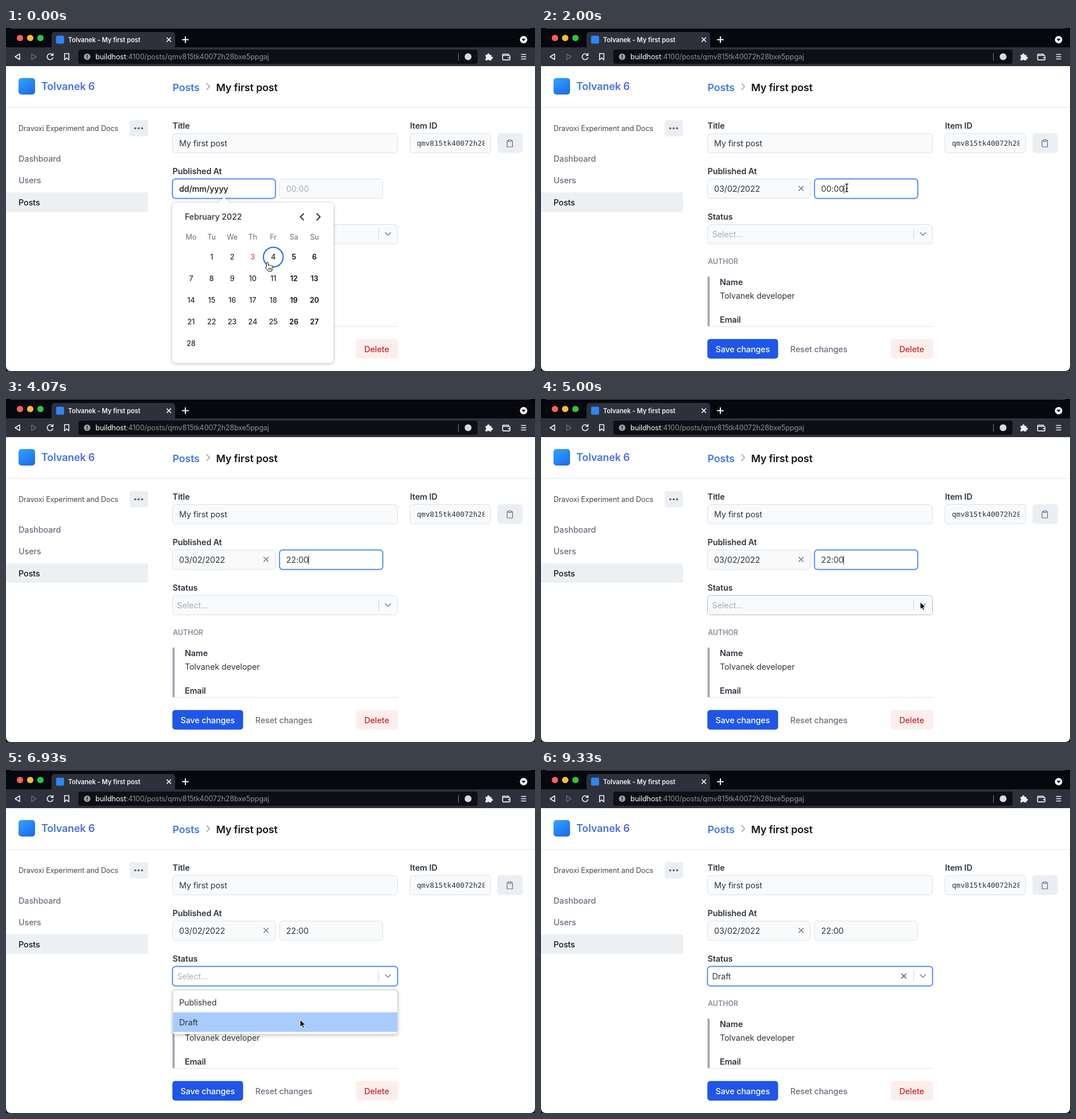
An HTML page for the animation above (9390 ms loop, 929 by 603 pixels).

```html
<!DOCTYPE html>
<html lang="en">
<head>
<meta charset="utf-8">
<title>Post editor</title>
<style>
  html, body { margin: 0; width: 100%; height: 100%; overflow: hidden; background: #000; }
  svg { display: block; font-family: Inter, sans-serif; letter-spacing: -.007em; }
  .mono { font-family: "DejaVu Sans Mono", monospace; letter-spacing: 0; }
  .field { fill: #f8fafb; stroke: #dce1e6; }
  .field.hover { stroke: #b4bcc6; }
  .field.focus { fill: #fff; stroke: #3b80ee; stroke-width: 1.5; filter: drop-shadow(0 0 1px #7fb2f8); }
  .popup { fill: #fff; filter: drop-shadow(0 1px 3px #0004); }
  .line { fill: none; stroke-width: 1.6; stroke-linecap: round; stroke-linejoin: round; }
  .cursor { stroke-linejoin: round; }
</style>
</head>
<body>
<svg id="stage" width="929" height="603" viewBox="0 0 929 603"></svg>
<script>
const LOOP = 9390;
const INK = '#30363f', MUTED = '#68707c', FAINT = '#a9aeb5';
const stage = document.getElementById('stage');

// y is the middle of the capital letters
const text = (x, y, str, { size = 14.45, weight = 400, fill = INK, anchor = 'start', extra = '' } = {}) =>
  `<text x="${x}" y="${y + size * 0.364}" font-size="${size}" font-weight="${weight}" fill="${fill}" text-anchor="${anchor}" ${extra}>${str}</text>`;
const rect = (x, y, w, h, fill, r = 0, extra = '') =>
  `<rect x="${x}" y="${y}" width="${w}" height="${h}" rx="${r}" fill="${fill}" ${extra}/>`;
const field = (x, y, w, id = '') =>
  `<rect id="${id}" class="field" x="${x}" y="${y}" width="${w}" height="34" rx="5"/>`;
const circle = (x, y, r, fill, extra = '') => `<circle cx="${x}" cy="${y}" r="${r}" fill="${fill}" ${extra}/>`;
const line = (d, stroke, width = 1.6) => `<path class="line" d="${d}" stroke="${stroke}" style="stroke-width:${width}"/>`;
const cross = (x, y, r, stroke, width) =>
  line(`M${x - r} ${y - r}l${2 * r} ${2 * r}m0 ${-2 * r}l${-2 * r} ${2 * r}`, stroke, width);
const label = (x, y, str) => text(x, y, str, { weight: 600 });
const group = (id, ...parts) => `<g id="${id}">${parts.join('')}</g>`;

const browser = () => [
  rect(0, 0, 929, 603, '#07080e', 9),
  line('M9 .5H920', '#4b4d55', 1),
  ...['#ff5f57', '#febc2e', '#28c840'].map((c, i) => circle(24.5 + 18 * i, 17.5, 5.6, c)),
  `<path d="M80 35V13q0-6 6-6H291q6 0 6 6V35z" fill="#2e313c"/>`,
  rect(88, 13.5, 14, 14, '#2b87f5', 2),
  text(109, 20.5, 'Tolvanek - My first post', { size: 11.3, weight: 600, fill: '#f0f1f4' }),
  cross(286, 20.5, 3.4, '#f0f1f4'),
  line('M310 20.5H320M315 15.5V25.5', '#fff', 2),
  circle(909, 20.5, 6.5, '#fff'),
  `<path d="M905.3 18.7h7.4l-3.7 4.6z" fill="#15161c"/>`,
  rect(0, 34, 929, 34, '#2e313c'),
  rect(127, 38, 701, 25, '#0e0f14', 4),
  line('M24 45.5V55.5L16 50.5z', '#f0f1f4'),
  line('M45 45.5V55.5L53 50.5z', '#62656f'),
  line('M81.8 47.5A5.2 5.2 0 1 0 82.5 52M82.6 44.8V48.3H79', '#f0f1f4'),
  line('M102.8 45h7.6v11l-3.8-3.3-3.8 3.3z', '#f0f1f4'),
  circle(142.5, 50.5, 5.7, '#9c9ea6'),
  line('M142.5 47.7v3.4m0 2.3v.1', '#0e0f14'),
  text(157, 50.5, 'buildhost<tspan fill="#8f9199">:4100/posts/qmv815tk40072h28bxe5ppgaj</tspan>', { size: 12.65, fill: '#fff' }),
  line('M794.5 44.5V57', '#777a84', 1),
  circle(811.5, 50.5, 6, '#d9dae0'),
  `<path d="M842 47.2h3.2a2 2 0 1 1 3.8 0h3.4v3.3a2 2 0 1 1 0 3.8v2.8h-3.6a1.9 1.9 0 0 0-3.6 0H842v-3.5a1.9 1.9 0 0 0 0-3.6z" fill="#eceef2"/>`,
  line('M873 46h9.5v2.2M872.2 46.5v8.4q0 1.2 1.2 1.2h10.4q1.2 0 1.2-1.2v-5.5q0-1.2-1.2-1.2h-10.4M882 52.2h3', '#f0f1f4'),
  line('M905 46.5h8m-8 4h8m-8 4h8', '#f0f1f4', 1.4),
  `<path d="M0 67H929V594q0 9-9 9H9q-9 0-9-9z" fill="#fff"/>`,
];

const sidebar = () => [
  rect(22, 88, 29, 29, 'url(#brand)', 5),
  text(62, 102.5, 'Tolvanek 6', { size: 18, weight: 600, fill: 'url(#title)' }),
  line('M0 139.5H929', '#e1e5e9', 1),
  text(22, 176.5, 'Dravoxi Experiment and Docs', { size: 12.8, fill: '#424954' }),
  rect(217, 162, 32.5, 28.5, '#ebeff3', 4),
  ...[0, 1, 2].map(i => circle(227 + 6 * i, 176.3, 1.9, '#626974')),
  text(22, 230, 'Dashboard', { weight: 500, fill: MUTED }),
  text(22, 268, 'Users', { weight: 500, fill: MUTED }),
  `<path d="M0 289H246q3.5 0 3.5 3.5V319.5q0 3.5-3.5 3.5H0z" fill="#ecf0f3"/>`,
  text(22, 306.5, 'Posts', { weight: 500, fill: '#121820' }),
];

const form = () => [
  text(292.5, 104, 'Posts', { size: 17.9, weight: 600, fill: '#4179e6' }),
  line('M352.5 97.5L357.5 103L352.5 108.5', '#9aa1ab'),
  text(369, 104, 'My first post', { size: 17.9, weight: 600, fill: '#10151c' }),
  label(292.5, 172, 'Title'),
  field(292.5, 185.5, 395),
  text(304, 202.5, 'My first post'),
  label(709.5, 172, 'Item ID'),
  field(709.5, 185.5, 141.5),
  text(721.5, 202, 'qmv815tk40072h28', { size: 12.65, extra: 'class="mono" clip-path="url(#idClip)"' }),
  rect(863, 185, 44.5, 34.5, '#ebeff3', 5),
  line('M882.5 198h-2.5v11h9.5v-11h-2.5m-4.5-1.5h4.5v3h-4.5z', '#626a75', 1.2),
  label(292.5, 251.5, 'Published At'),
  field(292.5, 265.5, 180.5, 'dateField'),
  text(304, 283, '', { extra: 'id="dateText"' }),
  group('dateClear', cross(456.7, 282, 3.9, '#555c66', 1.3)),
  field(480.5, 265.5, 181, 'timeField'),
  rect(492, 266.5, 40, 32, '#a8cdf8', 0, 'id="selection"'),
  text(492, 283, '', { extra: 'id="timeText"' }),
  rect(531, 275.5, 1, 15, '#111', 0, 'id="caret"'),
  label(292.5, 331.5, 'Status'),
  field(292.5, 345.5, 395, 'statusField'),
  text(300.5, 362.5, '', { extra: 'id="statusText"' }),
  group('statusClear', cross(637.2, 362.2, 3.6, '#737982', 2)),
  line('M654.5 353.5V371', '#cdd1d6', 1),
  line('M666.2 360L670.7 364.5L675.2 360', '#959ba3', 1.9),
  text(293, 410, 'AUTHOR', { size: 12.6, weight: 600, fill: '#89919c' }),
  rect(292.5, 437, 3.6, 87, '#a0a5ae'),
  label(314, 447, 'Name'),
  text(314, 471, 'Tolvanek developer'),
  label(314, 513, 'Email'),
  line('M293 524.5H688', '#dfe3e8', 1),
  rect(292.2, 546.7, 124.2, 34.6, '#1f56e8', 5),
  text(354.2, 564.5, 'Save changes', { weight: 500, fill: '#fff', anchor: 'middle' }),
  text(488, 564.5, 'Reset changes', { weight: 500, fill: MUTED, anchor: 'middle' }),
  rect(614.5, 546.7, 74, 34.6, '#fdeeee', 5),
  text(651, 564.5, 'Delete', { weight: 500, fill: '#c42b2b', anchor: 'middle' }),
];

const columnX = i => 325 + 36.1 * i;
const dayCell = day => {
  const col = day % 7, weekend = col > 4;
  return text(columnX(col), 402.8 + 38 * Math.floor(day / 7), day, {
    size: 12.8, anchor: 'middle', weight: weekend ? 600 : 500,
    fill: day === 3 ? '#ef4a4a' : weekend ? '#0c1016' : '#282e37',
  });
};
const calendar = () => group('calendar',
  `<path class="popup" d="M299 307H373L383 297.5L393 307H568q7 0 7 7V582q0 7-7 7H299q-7 0-7-7V314q0-7 7-7z"/>`,
  text(314, 332, 'February 2022', { weight: 500 }),
  line('M522.5 326.5L517 332L522.5 337.5M546 326.5L551.5 332L546 337.5', INK, 2),
  ...['Mo', 'Tu', 'We', 'Th', 'Fr', 'Sa', 'Su'].map((name, i) =>
    text(columnX(i), 367.8, name, { size: 12.7, fill: MUTED, anchor: 'middle' })),
  ...Array.from({ length: 28 }, (_, i) => dayCell(i + 1)),
  circle(0, 402.7, 17.3, 'none', 'id="dayRing" stroke="#1769e0" stroke-width="2"'));

const menu = () => group('menu',
  rect(293, 387, 394.5, 77.5, '#fff', 4, 'class="popup" stroke="#d3d7dc"'),
  rect(293.5, 390.5, 393.5, 35.5, '#d8e8fd', 0, 'id="option0"'),
  rect(293.5, 426, 393.5, 34.5, '#d8e8fd', 0, 'id="option1"'),
  text(304, 408.5, 'Published'),
  text(304, 443.8, 'Draft'));

const cursors = () => `<g id="cursor" class="cursor">
  <path id="hand" d="M-1.5 1.3a1.5 1.5 0 0 1 3 0V5.5a1.4 1.4 0 0 1 2.6.2a1.4 1.4 0 0 1 2.5.5a1.3 1.3 0 0 1 2.4.8V10.5c0 2-1.3 3-1.3 5H1.2c-.8-2-3.2-3.8-4.4-6c-.6-1.4 1-2 1.7-.9zM2.5 9.5v3.5m2-3.5v3.5m2-3.5v3.5" fill="#fff" stroke="#111"/>
  <path id="arrow" d="M0 0V12.7L3 10L5 14.5L7.2 13.5L5.3 9.2H9.3z" fill="#000" stroke="#fff"/>
  <path id="beam" d="M-2.5-7Q0-7 0-5Q0-7 2.5-7M0-5V5M-2.5 7Q0 7 0 5Q0 7 2.5 7M-1.5 1H1.5" fill="none" stroke="#111" stroke-width="1.3"/>
</g>`;

stage.innerHTML = `<defs>
  <linearGradient id="brand" x2=".6" y2="1"><stop stop-color="#2fa5fb"/><stop offset="1" stop-color="#1f6ff0"/></linearGradient>
  <linearGradient id="title"><stop stop-color="#3a78ee"/><stop offset="1" stop-color="#5169e2"/></linearGradient>
  <clipPath id="idClip"><rect x="721" y="190" width="119.5" height="26"/></clipPath>
</defs>` + [...browser(), ...sidebar(), ...form(), calendar(), menu(), cursors()].join('');

const el = Object.fromEntries([...stage.querySelectorAll('[id]')].filter(n => n.id).map(n => [n.id, n]));
const show = (node, on) => { node.style.display = on ? '' : 'none'; };
const setText = (node, str, fill) => { node.textContent = str; node.setAttribute('fill', fill); };
const setField = (node, focus, hover) => {
  node.classList.toggle('focus', focus);
  node.classList.toggle('hover', hover && !focus);
};

// time, x, y and the pointer shape used from then on
const route = [
  [0, 459, 412, 'hand'], [350, 434, 405, 'hand'], [700, 434, 405, 'arrow'],
  [1150, 537, 275, 'beam'], [1500, 537, 281, 'beam'], [2400, 537, 281, ''],
  [4560, 537, 281, 'beam'], [4680, 570, 303, 'arrow'], [4950, 666, 357, 'arrow'],
  [5500, 666, 357, 'arrow'], [6000, 563, 371, 'arrow'], [6100, 563, 371, 'arrow'],
  [6700, 516.5, 439, 'arrow'], [8000, 516.5, 439, 'arrow'], [8400, 540, -20, ''],
];
function pointerAt(t) {
  const i = route.findLastIndex(k => k[0] <= t);
  const a = route[i], b = route[i + 1] || a;
  const u = b === a ? 0 : (t - a[0]) / (b[0] - a[0]), e = u * u * (3 - 2 * u);
  return { x: a[1] + (b[1] - a[1]) * e, y: a[2] + (b[2] - a[2]) * e, shape: a[3] };
}

const CLOSE = 700, TIME_FOCUS = 1550, SELECT = 2350, TYPE = 3100, KEY = 190, OPEN = 5300, PRESS = 6850, CHOOSE = 7030;

function draw(t) {
  const p = pointerAt(t);
  el.cursor.setAttribute('transform', `translate(${p.x} ${p.y})`);
  for (const shape of ['hand', 'arrow', 'beam']) show(el[shape], p.shape === shape);

  const picked = t >= CLOSE, timeFocus = t >= TIME_FOCUS && t < OPEN;
  show(el.calendar, !picked);
  el.dayRing.setAttribute('cx', columnX(p.x < 451 ? 3 : 4));
  show(el.dateClear, picked);
  setField(el.dateField, t < TIME_FOCUS, false);
  setText(el.dateText, picked ? '03/02/2022' : 'dd/mm/yyyy', picked ? INK : '#10151c');
  el.dateText.setAttribute('font-weight', picked ? 400 : 500);

  const typed = Math.floor((t - TYPE) / KEY) + 1;
  const value = t < TYPE ? '00:00' : '22:00'.slice(0, typed);
  const overTime = p.shape === 'beam' && p.x > 480 && p.y > 265 && p.y < 300;
  setField(el.timeField, timeFocus, overTime);
  setText(el.timeText, value, picked ? INK : FAINT);
  const selected = t >= SELECT && t < TYPE;
  show(el.selection, selected);
  const lastEdit = t < TYPE ? TIME_FOCUS : Math.min(t, TYPE + 4 * KEY);
  show(el.caret, timeFocus && !selected && Math.floor((t - lastEdit) / 500) % 2 === 0);
  const width = el.timeText.getComputedTextLength();
  el.caret.setAttribute('x', 491.5 + width);
  el.selection.setAttribute('width', width);

  const chosen = t >= CHOOSE, overDraft = p.y > 426;
  const overStatus = p.shape === 'arrow' && p.x > 293 && p.y > 345 && p.y < 380;
  setField(el.statusField, t >= OPEN, picked && overStatus);
  setText(el.statusText, chosen ? 'Draft' : 'Select...', chosen ? INK : FAINT);
  show(el.statusClear, chosen);
  show(el.menu, t >= OPEN && !chosen);
  show(el.option0, !overDraft);
  show(el.option1, overDraft);
  el.option1.setAttribute('fill', t >= PRESS ? '#a7ccfd' : '#d8e8fd');
}

const start = performance.now();
function tick() {
  draw((performance.now() - start) % LOOP);
  requestAnimationFrame(tick);
}
tick();
</script>
</body>
</html>
```
